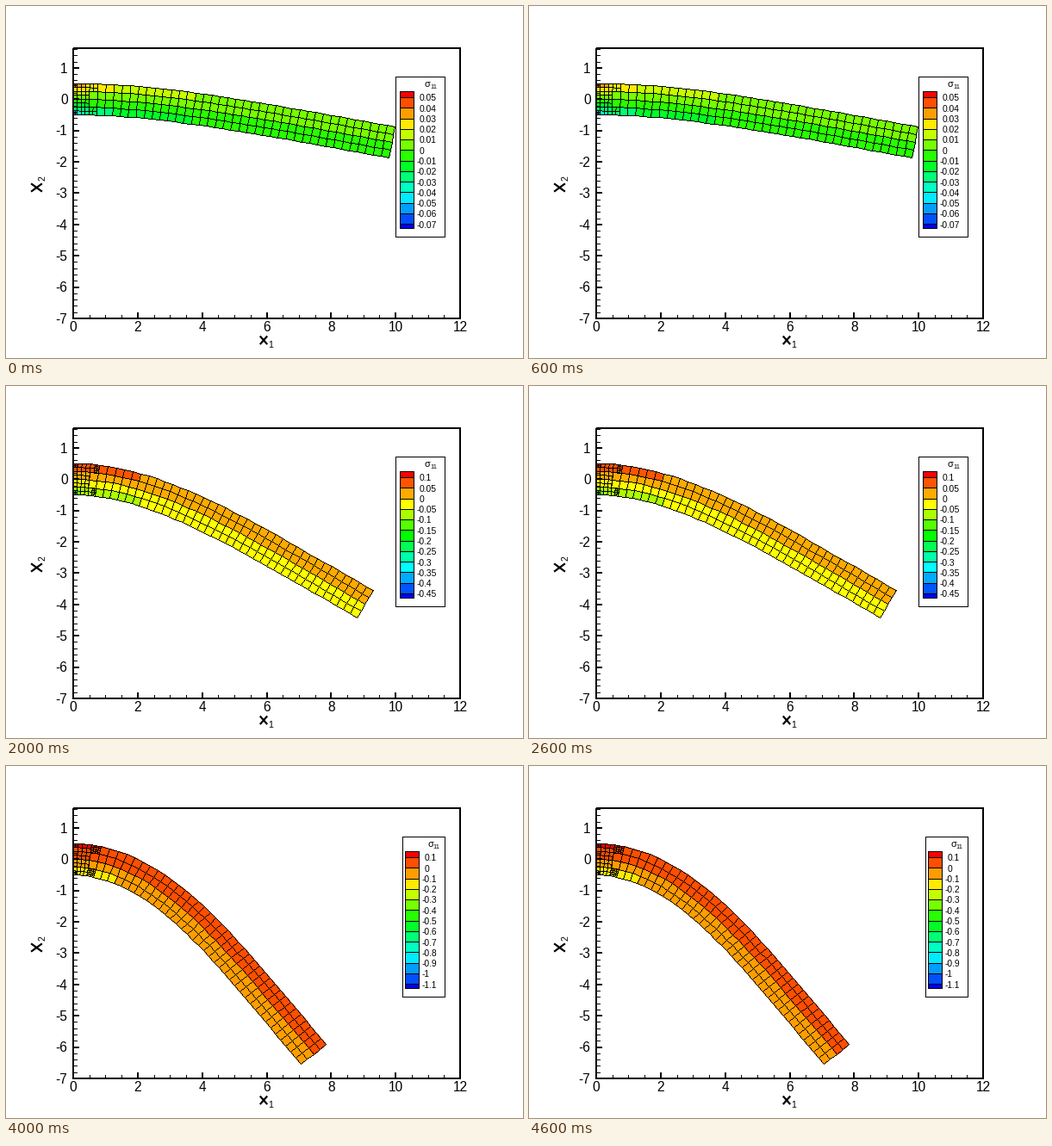
Recreate the animation shown at these times as a matplotlib script. Size 600 by 409 pixels, loop 5000 ms.

```python
import numpy as np
import matplotlib.pyplot as plt
from matplotlib.animation import FuncAnimation
from matplotlib.collections import PolyCollection
from matplotlib.patches import Rectangle

W, H, DPI = 600, 409, 64
PT = 72 / DPI                                   # points per pixel
LEFT, RIGHT, TOP, BOTTOM = 78, 527, 49, 363
SX, SY, Y0 = 37.42, 36.38, 108.3
LENGTH, CELL, ROW = 10, 0.25, 12.27

# tip centre, tip angle, bending exponent, stress scale (tension, compression),
# highest level, level step, level count, legend box left, swatch left
STEPS = [
    dict(tip=(448.0, 158.5), angle=.185, p=3.0, pull=.0704, push=.0704,
         top=.05, step=.01, n=13, box=452, sw=457),
    dict(tip=(436.5, 207.0), angle=.360, p=3.3, pull=.150, push=.140,
         top=.10, step=.02, n=18, box=452, sw=457),
    dict(tip=(416.8, 253.5), angle=.535, p=3.4, pull=.206, push=.220,
         top=.10, step=.05, n=12, box=452, sw=457),
    dict(tip=(390.0, 296.5), angle=.715, p=3.5, pull=.275, push=.290,
         top=.10, step=.05, n=17, box=452, sw=457),
    dict(tip=(357.0, 335.0), angle=.895, p=3.6, pull=.270, push=.370,
         top=.10, step=.10, n=13, box=460, sw=463),
]

plt.rcParams['font.family'] = 'Liberation Sans'
fig = plt.figure(figsize=(W / DPI, H / DPI), dpi=DPI, facecolor='white')
ax = fig.add_axes([0, 0, 1, 1])
ax.set(xlim=(0, W), ylim=(H, 0))
ax.axis('off')


def line(xs, ys, lw=1, aa=False):
    ax.plot(xs, ys, color='k', lw=lw * PT, antialiased=aa,
            solid_capstyle='butt', solid_joinstyle='miter')


def text(x, y, s, size, ha='left', **kw):
    return ax.text(x, y, s, fontsize=size * PT, ha=ha, va='baseline',
                   color='k', **kw)


def rect(x0, y0, x1, y1, color):
    return ax.add_patch(Rectangle((x0, y0), x1 - x0, y1 - y0, fc=color,
                                  ec='k', lw=PT, antialiased=False, zorder=3))


def cross(x, y, w, h):
    for side in (-1, 1):
        line([x - w / 2, x + w / 2], [y - side * h / 2, y + side * h / 2], 2.2, True)


def draw_axes():
    line([LEFT, RIGHT, RIGHT, LEFT, LEFT], [TOP, TOP, BOTTOM, BOTTOM, TOP], 2)
    for i in range(25):
        x, major = LEFT + i * SX / 2, i % 4 == 0
        line([x, x], [BOTTOM, BOTTOM - (7 if major else 4)], 2 if major else 1)
        if major:
            text(x, 378, str(i // 2), 15.5, 'center')
    for i in range(-35, 9):
        y, major = Y0 - i * SY / 5, i % 5 == 0
        line([LEFT, LEFT + (7 if major else 4)], [y, y], 2 if major else 1)
        if major:
            text(71.5, y + 5.8, str(i // 5), 15.5, 'right')
    cross(299, 388.3, 8.4, 9.6)
    text(307.3, 397, '1', 10.5, 'center')
    cross(35.5, 211, 12.8, 9.4)
    text(47, 200.5, '2', 10.5, 'right', rotation=90).set_va('center')


def rainbow(n):
    """Red, yellow, green, cyan, blue in n even steps."""
    t = np.linspace(0, 4, n)
    return np.clip(np.c_[2 - t, np.minimum(t, 4 - t), t - 2], 0, 1)


def levels(c):
    return np.round(c['top'] - c['step'] * np.arange(c['n']), 4) + 0.0


def needs_split(x, y, size, k):
    y = abs(y)
    if size == CELL:
        return x < .5 or (x < .75 and y > .25)
    if size == CELL / 2:
        corner = x < .15 and y > .375
        patch = k > 0 and (.5 if k == 4 else .6) < x < .75 and y > .25
        return corner or patch
    return False


def split(x, y, size, k):
    if not needs_split(x + size / 2, y + size / 2, size, k):
        return [(x, y, size)]
    h = size / 2
    return [c for dx in (0, h) for dy in (0, h)
            for c in split(x + dx, y + dy, h, k)]


def mesh(k):
    cells = [c for i in range(40) for j in range(4)
             for c in split(i * CELL, j * CELL - .5, CELL, k)]
    return np.array(cells).T


def bend(c, s, eta):
    """Pixel position of a beam point at arc length s and height eta."""
    u = np.linspace(0, 1, 1601)
    th = c['angle'] * (1 - (1 - u) ** c['p'])

    def path(f, end):
        run = np.r_[0, np.cumsum((f[1:] + f[:-1]) / 2)]
        return run / run[-1] * end

    cx = path(np.cos(th), c['tip'][0] - LEFT)
    cy = path(np.sin(th), c['tip'][1] - Y0)
    v = s / LENGTH
    a = np.interp(v, u, th)
    return (LEFT + np.interp(v, u, cx) + eta * np.sin(a) * SX,
            Y0 + np.interp(v, u, cy) - eta * np.cos(a) * SY)


def stress(c, s, eta):
    scale = np.where(eta > 0, c['pull'], c['push'])
    peak = 1 + .9 * np.exp(-s / .12) * (2 * abs(eta)) ** 4
    return scale * eta * (1 - s / LENGTH) ** 2 * peak


def outline(polys):
    """Layer with one-pixel, unsmoothed edges of all polygons."""
    layer = np.zeros((H, W, 4))
    ends = np.floor(polys)
    for poly in ends:
        for p, q in zip(poly, np.roll(poly, -1, axis=0)):
            p, q = sorted([tuple(p), tuple(q)])
            n = int(max(abs(q[0] - p[0]), abs(q[1] - p[1]))) + 1
            x, y = np.floor(np.linspace(p, q, n) + .5).astype(int).T
            layer[y, x, 3] = 1
    return layer


def draw_beam(k):
    c = STEPS[k]
    x, y, d = mesh(k)
    corners = [bend(c, x + a * d, y + b * d)
               for a, b in ((0, 0), (1, 0), (1, 1), (0, 1))]
    polys = np.array(corners).transpose(2, 0, 1)
    value = stress(c, x + d / 2, y + d / 2)
    band = (value[:, None] < levels(c)).sum(axis=1)
    fill = PolyCollection(np.floor(polys) + .5, edgecolors='none', zorder=1.2,
                          facecolors=rainbow(c['n'] + 1)[band],
                          antialiaseds=False)
    edges = ax.imshow(outline(polys), extent=(0, W, H, 0), aspect='auto',
                      interpolation='nearest', zorder=1.5)
    return [ax.add_collection(fill, autolim=False), edges]


def draw_legend(c):
    n, sw = c['n'], c['sw']
    edges = np.r_[99, 106 + ROW * np.arange(n), 106 + ROW * (n - 1) + 5]
    edges = np.round(edges)
    out = [rect(c['box'], 82, 509, edges[-1] + 10, 'white')]
    for y0, y1, color in zip(edges, edges[1:], rainbow(n + 1)):
        out.append(rect(sw, y0, sw + 16, y1, color))
    for i, v in enumerate(levels(c)):
        out.append(text(sw + (20 if v < 0 else 23), 110.4 + ROW * i,
                        f'{v:g}', 10.2, zorder=4))
    x = 486 + (sw - 457) / 2
    out.append(text(x, 94.5, 'σ', 11, zorder=4))
    out.append(text(x + 6.5, 96.5, '11', 7.5, zorder=4))
    return out


shown = []


def update(k):
    while shown:
        shown.pop().remove()
    shown.extend(draw_beam(k))
    shown.extend(draw_legend(STEPS[k]))
    return shown


draw_axes()
anim = FuncAnimation(fig, update, frames=len(STEPS), init_func=lambda: [],
                     interval=1000, repeat=True, repeat_delay=0, blit=False)
plt.show()
```
